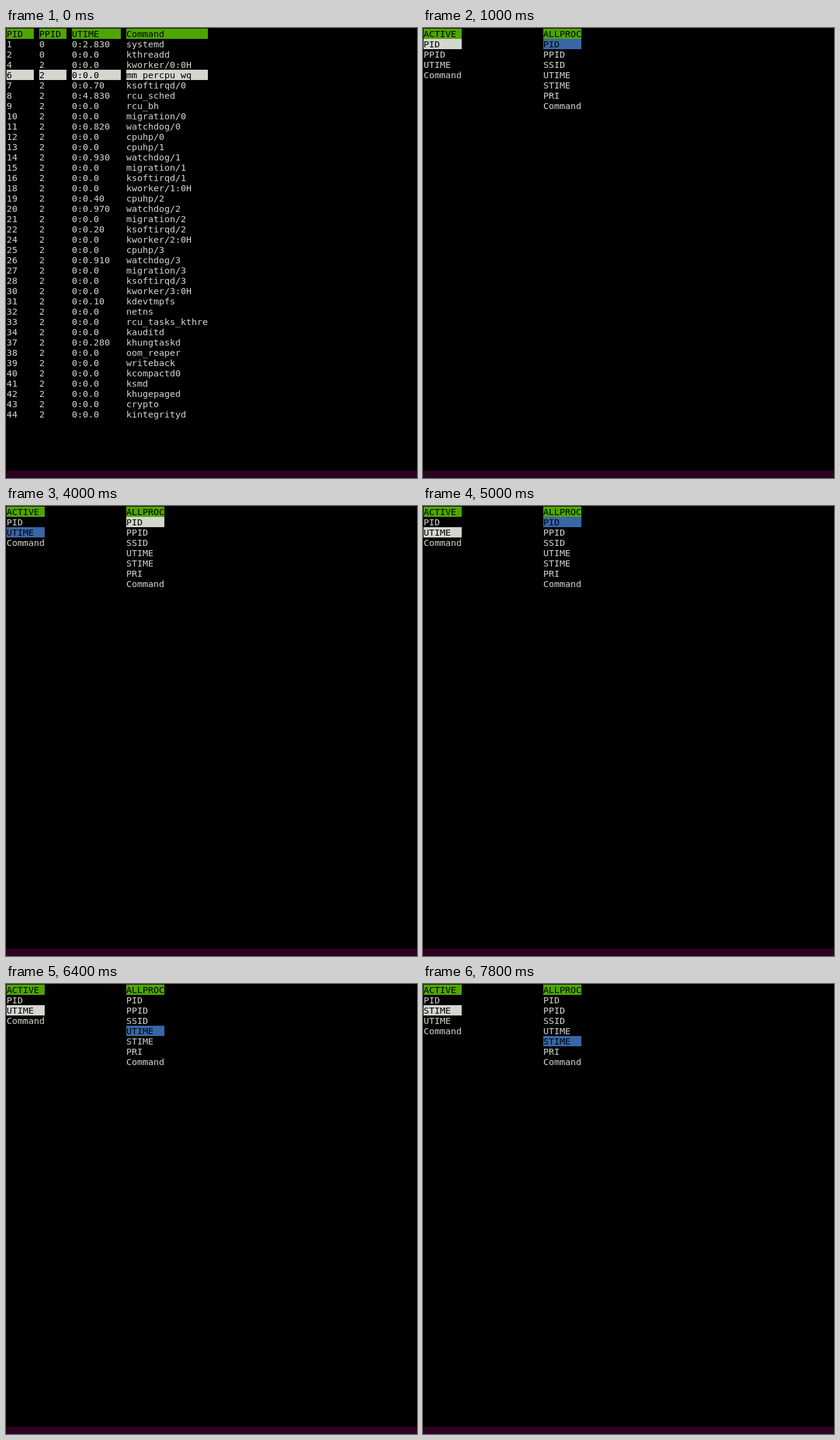
An HTML page for the animation above (8000 ms loop, 680 px wide and 744 px high).

```html
<!DOCTYPE html>
<html lang="en">
<head>
<meta charset="utf-8">
<title>Process monitor</title>
<style>
  html, body { margin: 0; width: 100%; height: 100%; overflow: hidden; background: #000; }
  svg { display: block; width: 680px; height: 744px; }
  text { font: 14.95px "DejaVu Sans Mono", "Noto Sans Mono", monospace; white-space: pre; }
</style>
</head>
<body>
<svg id="stage" viewBox="0 0 680 744" xmlns="http://www.w3.org/2000/svg"></svg>
<script>
const LOOP = 8000, CHAR = 9, LINE = 17;
const GREEN = '#4fa500', WHITE = '#d3d7cf', BLUE = '#3867a6';
const stage = document.getElementById('stage');

function add(parent, tag, attrs, text) {
  const el = document.createElementNS('http://www.w3.org/2000/svg', tag);
  for (const key in attrs) el.setAttribute(key, attrs[key]);
  if (text) el.textContent = text;
  parent.append(el);
  return el;
}

// One terminal cell; a background colour turns the text black.
function cell(parent, x, row, text, width, back) {
  const y = row * LINE + 1;
  if (back) add(parent, 'rect', { x, y, width: width * CHAR, height: LINE, fill: back });
  add(parent, 'text', { x, y: y + 14, fill: back ? '#000' : WHITE }, text);
}

add(stage, 'rect', { width: 680, height: 744, fill: '#2c0320' });
add(stage, 'rect', { width: 680, height: 732, fill: '#10020b' });
add(stage, 'rect', { x: 1, y: 1, width: 679, height: 731, fill: '#000' });

// Process table: pid command [user time]; every parent but the first two is 2.
const processes = `1 systemd 2.830
2 kthreadd
4 kworker/0:0H
6 mm_percpu_wq
7 ksoftirqd/0 0.70
8 rcu_sched 4.830
9 rcu_bh
10 migration/0
11 watchdog/0 0.820
12 cpuhp/0
13 cpuhp/1
14 watchdog/1 0.930
15 migration/1
16 ksoftirqd/1
18 kworker/1:0H
19 cpuhp/2 0.40
20 watchdog/2 0.970
21 migration/2
22 ksoftirqd/2 0.20
24 kworker/2:0H
25 cpuhp/3
26 watchdog/3 0.910
27 migration/3
28 ksoftirqd/3
30 kworker/3:0H
31 kdevtmpfs 0.10
32 netns
33 rcu_tasks_kthre
34 kauditd
37 khungtaskd 0.280
38 oom_reaper
39 writeback
40 kcompactd0
41 ksmd
42 khugepaged
43 crypto
44 kintegrityd`.split('\n').map(line => {
  const [pid, command, time = '0.0'] = line.split(' ');
  return [pid, pid > 2 ? '2' : '0', '0:' + time, command];
});

const columns = [[1, 5], [55, 5], [109, 9], [199, 15]];

function drawTable(parent) {
  [['PID', 'PPID', 'UTIME', 'Command'], ...processes].forEach((values, row) => {
    const back = row === 0 ? GREEN : values[0] === '6' ? WHITE : null;
    columns.forEach(([x, width], i) => cell(parent, x, row, values[i], width, back));
  });
}

const ALL = ['PID', 'PPID', 'SSID', 'UTIME', 'STIME', 'PRI', 'Command'];
const START = ['PID', 'PPID', 'UTIME', 'Command'];
const CUT = ['PID', 'UTIME', 'Command'];
const GROWN = ['PID', 'STIME', 'UTIME', 'Command'];

function drawList(parent, x, title, items, cursor, focused) {
  cell(parent, x, 0, title, 7, GREEN);
  items.forEach((item, i) =>
    cell(parent, x, i + 1, item, 7, i === cursor ? (focused ? BLUE : WHITE) : null));
}

const menu = (active, left, right, focus) => parent => {
  drawList(parent, 1, 'ACTIVE', active, left, focus === 'left');
  drawList(parent, 199, 'ALLPROC', ALL, right, focus === 'right');
};

const scenes = [
  [0, drawTable],
  [400, menu(START, 0, 0, 'right')],
  [2400, menu(START, 0, 0, 'left')],
  [3000, menu(START, 1, 0, 'left')],
  [4000, menu(CUT, 1, 0, 'left')],
  [5000, menu(CUT, 1, 0, 'right')],
  [5800, menu(CUT, 1, 1, 'right')],
  [6000, menu(CUT, 1, 2, 'right')],
  [6400, menu(CUT, 1, 3, 'right')],
  [6800, menu(CUT, 1, 4, 'right')],
  [7800, menu(GROWN, 1, 4, 'right')]
].map(([at, draw]) => {
  const group = add(stage, 'g', { display: 'none' });
  draw(group);
  return { at, group };
});

let shown = null;

function update(time) {
  const next = scenes.findLast(scene => scene.at <= time);
  if (next === shown) return;
  if (shown) shown.group.setAttribute('display', 'none');
  next.group.removeAttribute('display');
  shown = next;
}

const start = performance.now();

function tick() {
  update((performance.now() - start) % LOOP);
  requestAnimationFrame(tick);
}
tick();
</script>
</body>
</html>
```
